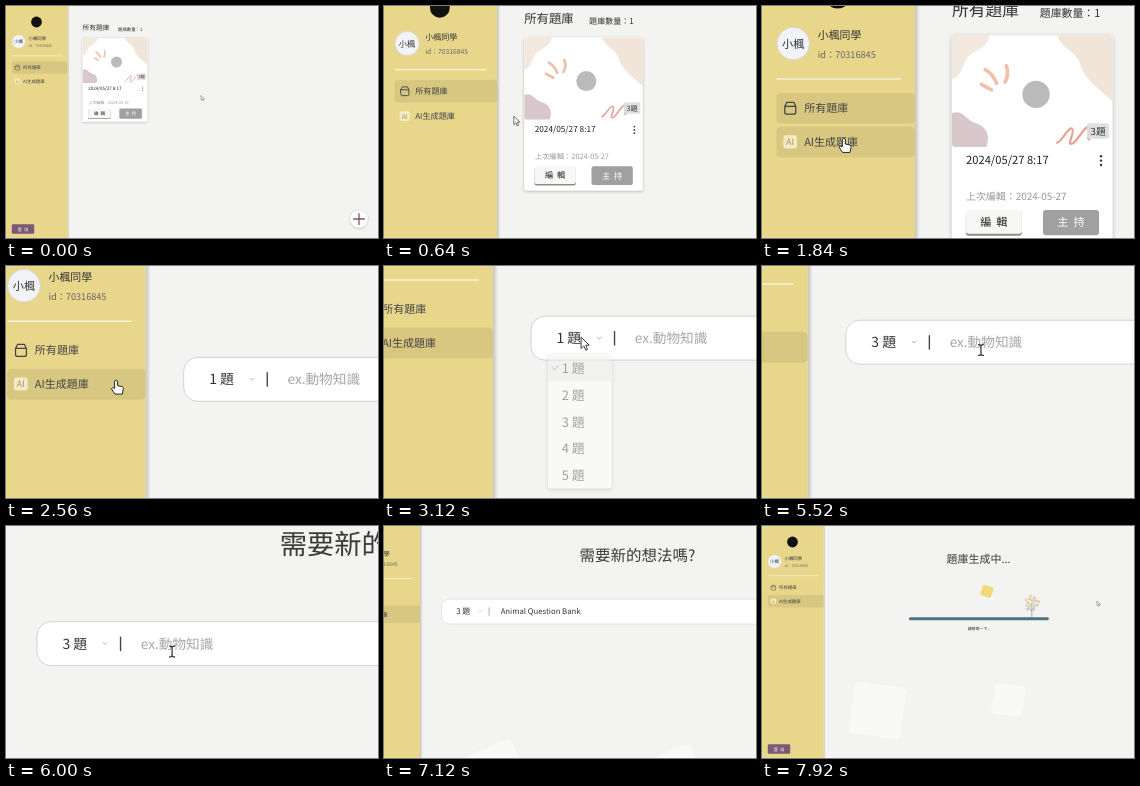
An HTML page for the animation above (8000 ms loop, 372x232 px).

```html
<!DOCTYPE html>
<html lang="zh-Hant">
<head>
<meta charset="utf-8">
<style>
html, body { margin: 0; width: 100%; height: 100%; overflow: hidden; background: #f3f2f0; }
svg { display: block; width: 100vw; height: 100vh; }
text {
  font-family: "Noto Sans CJK TC", "Noto Sans CJK JP", "Noto Sans CJK SC", "Noto Sans", sans-serif;
  text-rendering: geometricPrecision; white-space: pre;
}
</style>
</head>
<body>
<svg id="stage" viewBox="0 0 372 232" xmlns="http://www.w3.org/2000/svg"></svg>
<script>
const LOOP = 8000, OPEN_AI = 2240, PICK = 4880, TYPE = 6400, SUBMIT = 7440;
const QUERY = "Animal Question Bank";
const INK = "#333", PURPLE = "#7b5873";

// Markup helpers; text is placed by its vertical centre.
const rect = (x, y, w, h, r, fill, more = "") =>
  `<rect x="${x}" y="${y}" width="${w}" height="${h}" rx="${r}" fill="${fill}" ${more}/>`;
const circle = (x, y, r, fill, more = "") => `<circle cx="${x}" cy="${y}" r="${r}" fill="${fill}" ${more}/>`;
const path = (d, fill, more = "") => `<path d="${d}" fill="${fill}" ${more}/>`;
const line = (d, color, width, more = "") =>
  path(d, "none", `stroke="${color}" stroke-width="${width}" stroke-linecap="round" stroke-linejoin="round" ${more}`);
const text = (x, y, size, str, fill = INK, more = "") =>
  `<text x="${x}" y="${y + size * 0.37}" font-size="${size}" fill="${fill}" ${more}>${str}</text>`;
const group = (id, body, more = "") => `<g id="${id}" ${more}>${body}</g>`;
const MID = 'text-anchor="middle"', MEDIUM = 'font-weight="500"';

const navBack = y => rect(5.8, y - 6.2, 55.9, 12.5, 1.8, "#000", 'opacity=".075"');

const sidebar = () =>
  rect(61.7, -5, 2, 245, 0, "url(#edge)") +
  rect(-5, -5, 66.7, 245, 0, "#e8d78b") +
  circle(30.5, 16, 5.4, "#111") +
  circle(12.6, 35.5, 6.6, "#f1f3f6", 'stroke="#d6d6d2" stroke-width=".4"') +
  text(12.6, 35.7, 4.5, "小楓", INK, MID) +
  text(22.5, 32, 4.4, "小楓同學") +
  text(22.5, 39.8, 3.7, "id：70316845", "#666") +
  line("M6.2 49.8H55.8", "#f8f1d6", 0.6) +
  group("nav1", navBack(61.5)) + group("nav2", navBack(75.2)) +
  line("M9.2 60.8H13.6V63.2Q13.6 64 12.8 64H10Q9.2 64 9.2 63.2ZM9.2 60.8L10 59.2H12.8L13.6 60.8", "#444", 0.5) +
  text(17, 61.5, 4.45, "所有題庫", "#444") +
  rect(8.6, 72.5, 5.5, 5.3, 1, "#f4ebc4") +
  text(11.35, 75.2, 3.6, "AI", "#a5935a", MID + MEDIUM) +
  text(17, 75.2, 4.45, "AI生成題庫", "#444") +
  rect(5.8, 218.2, 22.4, 9.6, 1.2, PURPLE) +
  text(17, 223, 4.5, "登  出", "#fff", MID);

const card = () =>
  rect(76.6, 32.2, 64.7, 83.6, 1.4, "#fff", 'filter="url(#soft)"') +
  `<g clip-path="url(#cover)">` +
  path("M76.6 32H92C90 38 86 38 83 41C81 44 80 49 76.6 50Z", "#f2e8dd") +
  path("M141.4 32H119C121 38 126 38 128 43C130 50 134 52 141.4 59Z", "#f0e5d8") +
  path("M76.6 63.5C81 62 82 66 86 67.5C91 69 92 73 90.5 77.2H76.6Z", "#d8c8cc") +
  line("M119 75.5C121 75 123.5 69 125 69.8C126.5 71 123 76 124.6 76C127 76 130 68 132 69.2C133 71 130.5 74 132 74.2", "#e6a394", 0.9) +
  line("M88.5 52L92.5 54.2M90 46Q93 47.5 94.6 51.5M98.5 44.5Q99.8 48 98 51", "#efc0ab", 1.5) +
  circle(110.5, 56, 5.5, "#bababa") +
  `</g>` +
  rect(131, 67.6, 9, 6.3, 1, "#dedddd", 'opacity=".9"') +
  text(135.5, 70.8, 3.9, "3題", INK, MID + MEDIUM) +
  text(82.3, 82.4, 4.5, "2024/05/27 8:17", "#222", MEDIUM) +
  [80.9, 82.7, 84.5].map(y => circle(136.7, y, 0.48, "#333")).join("") +
  text(82.3, 97, 4, "上次編輯：2024-05-27", "#999") +
  rect(82.2, 103, 22.6, 10, 1.2, "#8d8d8a") +
  rect(82.2, 102.6, 22.6, 9.6, 1.2, "#f7f7f5") +
  text(93.5, 107.4, 4.5, "編  輯", "#222", MID + MEDIUM) +
  rect(113.3, 102.6, 22.6, 10.2, 1.2, "#a0a0a0") +
  text(124.6, 107.6, 4.5, "主  持", "#fff", MID + MEDIUM);

const library = () =>
  text(76.6, 22, 6.75, "所有題庫", INK, MEDIUM) +
  text(112, 23, 4.4, "題庫數量：1", INK, MEDIUM) +
  card() +
  circle(353, 213, 8.7, "#fff", 'filter="url(#soft)"') +
  line("M347.6 213H358.4M353 207.6V218.4", PURPLE, 1.3);

const menu = () =>
  rect(83.9, 79.8, 25.6, 54, 1, "#fff", 'filter="url(#soft)"') +
  rect(83.9, 79.8, 25.6, 10.8, 1, "#f0f0ee") +
  line("M85.7 85.2L86.5 86L88 84.4", "#888", 0.4) +
  rect(83.9, 101.6, 25.6, 10.8, 0, "#f0f0ee", 'id="hover"') +
  [1, 2, 3, 4, 5].map(n => text(89.4, 74.5 + n * 10.82, 5.2, n + " 題", "#555")).join("");

const ask = () =>
  text(216, 33.2, 11, "需要新的想法嗎?", "#3a3a3a", MID) +
  rect(77, 64.4, 280, 17.7, 5.6, "#fff", 'stroke="#d2d2d0" stroke-width=".4"') +
  text(87.3, 73.2, 5.6, "1 題", INK, 'id="count"' + MEDIUM) +
  line("M103.7 72.8L104.5 73.6L105.3 72.8", "#aaa", 0.35) +
  line("M110.7 70.6V76", "#444", 0.55, 'id="bar"') +
  text(118.9, 73.2, 5.5, "", INK, 'id="query"') +
  group("menu", menu());

const leaves = Array.from({ length: 16 }, (_, i) => {
  const a = i * 2.4, r = 1.9 * Math.sqrt(i + 0.4);
  return circle(269.8 + r * Math.cos(a), 77.2 + r * Math.sin(a), 1.5, ["#d9d6c8", "#e6cf86", "#c6cbc8"][i % 3]);
}).join("");

const wait = () =>
  text(216.5, 33.2, 11, "題庫生成中...", "#3a3a3a", MID + MEDIUM) +
  line("M269.8 77V92M269.8 85L266 80M269.8 84L273.5 79.5", "#8f9492", 0.7) + leaves +
  rect(147, 91.3, 139.8, 2.9, 1.2, "#4e757b") +
  group("cube", rect(-5.5, -5.5, 11, 11, 1.8, "#f1d977")) +
  text(217, 103, 3.9, "請稍等一下...", "#222", MID);

const pointers = () =>
  group("arrow", path("M0 0V4.6L1.1 3.6L1.9 5.3L2.6 5L1.9 3.3H3.3Z", "#fff", 'stroke="#333" stroke-width=".38"')) +
  group("hand", path("M-.6 .5Q0-.3 .6.5V2.4L2.5 2.8Q3 3 2.9 3.8L2.5 5.8H-.5L-1.9 3.7Q-1.7 2.8-.6 3.5Z", "#fff", 'stroke="#222" stroke-width=".4"')) +
  group("beam", line("M-1-2.2Q0-2.2 0-1.6Q0-2.2 1-2.2M0-1.6V1.6M-1 2.2Q0 2.2 0 1.6Q0 2.2 1 2.2", "#333", 0.5));

const stage = document.getElementById("stage");
stage.innerHTML = `<defs>
  <linearGradient id="edge"><stop stop-color="#000" stop-opacity=".2"/><stop offset="1" stop-color="#000" stop-opacity="0"/></linearGradient>
  <filter id="soft" x="-20%" y="-20%" width="140%" height="140%"><feDropShadow dx="0" dy=".5" stdDeviation=".8" flood-opacity=".28"/></filter>
  <clipPath id="cover">${rect(76.6, 32.2, 64.7, 45, 1.4, "#fff")}</clipPath>
</defs>` + rect(0, 0, 372, 232, 0, "#f3f3f1") +
  group("world",
    group("floats", group("big", rect(-26, -26, 52, 52, 4.5, "#f9f9f5")) + group("small", rect(-15.5, -15.5, 31, 31, 3.5, "#f9f9f5"))) +
    group("library", library()) + group("ask", ask()) + group("wait", wait()) +
    sidebar() + group("cursor", pointers()));

const el = {};
stage.querySelectorAll("[id]").forEach(n => el[n.id] = n);

// Keys: time, then values.
const camera = [
  [0, 1, 0, 0], [640, 1.83, 0, -27.5], [1200, 2.44, 0, -49], [1840, 2.48, 0, -50.5], [2240, 2.48, 0, -50.5],
  [3120, 2.48, -44, -109.5], [5360, 2.48, -44, -109.5], [5520, 2.48, -107, -105.5], [6000, 2.48, -160, -64],
  [6880, 2.48, -160, -64], [7120, 1.41, -51, -17.7], [7760, 1, 0, 0], [8000, 1, 0, 0]
];
const mouse = [
  [0, 195, 89.5], [640, 71, 75.2], [1150, 36, 74], [1840, 33, 73.6], [2320, 33, 73.6], [3040, 97.2, 72.8],
  [3600, 97.2, 72.8], [4400, 97, 106], [4880, 97, 106], [5200, 126, 77], [5520, 131.5, 76.4],
  [6880, 131.5, 76.4], [7100, 335, 75], [8000, 335, 75]
];

// Smooth interpolation through the keys without overshoot.
function sample(keys, t) {
  let i = 0;
  while (i < keys.length - 2 && t >= keys[i + 1][0]) i++;
  const slope = (k, c) => (keys[k + 1][c] - keys[k][c]) / (keys[k + 1][0] - keys[k][0]);
  const tangent = (k, c) => {
    if (k === 0 || k === keys.length - 1) return 0;
    const a = slope(k - 1, c), b = slope(k, c);
    return a * b > 0 ? 2 * a * b / (a + b) : 0;
  };
  const d = keys[i + 1][0] - keys[i][0], u = (t - keys[i][0]) / d, v = 1 - u;
  return keys[i].slice(1).map((p, n) => {
    const c = n + 1;
    return p * (1 + 2 * u) * v * v + keys[i + 1][c] * u * u * (3 - 2 * u) +
      d * u * v * (tangent(i, c) * v - tangent(i + 1, c) * u);
  });
}

const clamp = x => Math.max(0, Math.min(1, x));
const show = (node, on) => node.setAttribute("display", on ? "inline" : "none");
const place = (node, x, y, turn = 0) =>
  node.setAttribute("transform", `translate(${x} ${y}) rotate(${turn})`);

function draw(t) {
  const [zoom, cx, cy] = sample(camera, t);
  el.world.setAttribute("transform", `translate(${cx} ${cy}) scale(${zoom})`);

  const onAi = t >= OPEN_AI, waiting = t >= SUBMIT;
  const [mx, my] = sample(mouse, t);
  show(el.library, !onAi);
  show(el.ask, onAi && !waiting);
  show(el.wait, waiting);
  show(el.floats, onAi);
  show(el.nav1, !onAi);
  show(el.nav2, onAi || mx < 61);

  const rise = (t - 7120) / 800;
  place(el.big, 112 + 3.5 * rise, 197 - 12.5 * rise, -23 + 31 * rise);
  place(el.small, 244 + 2.5 * rise, 187 - 13 * rise, -23 + 31 * rise);
  place(el.cube, 225, 65.3 - 4 * Math.sin((t - 7920) / 260), 18 + (t - 7920) * 0.1);

  const open = clamp((t - 3020) / 200) * (1 - clamp((t - PICK) / 240));
  el.menu.setAttribute("opacity", open);
  const row = Math.round((my - 85.3) / 10.82);
  show(el.hover, row > 0);
  el.hover.setAttribute("y", 79.8 + Math.max(0, row) * 10.82);
  el.count.textContent = (t < PICK ? 1 : 3) + " 題";

  const typed = Math.ceil(QUERY.length * clamp((t - TYPE + 80) / 320));
  el.query.textContent = typed ? QUERY.slice(0, typed) : "ex.動物知識";
  el.query.setAttribute("fill", typed ? INK : "#a6a6a6");
  el.bar.setAttribute("stroke", t > 6880 ? "#999" : "#444");

  place(el.cursor, mx, my);
  const beam = t > 5080 && t < 6900, hand = mx < 61;
  show(el.beam, beam);
  show(el.hand, hand);
  show(el.arrow, !beam && !hand);
  show(el.cursor, t < TYPE || t > 6880);
}

function tick(now) {
  draw(now % LOOP);
  requestAnimationFrame(tick);
}
draw(0);
requestAnimationFrame(tick);
</script>
</body>
</html>
```
